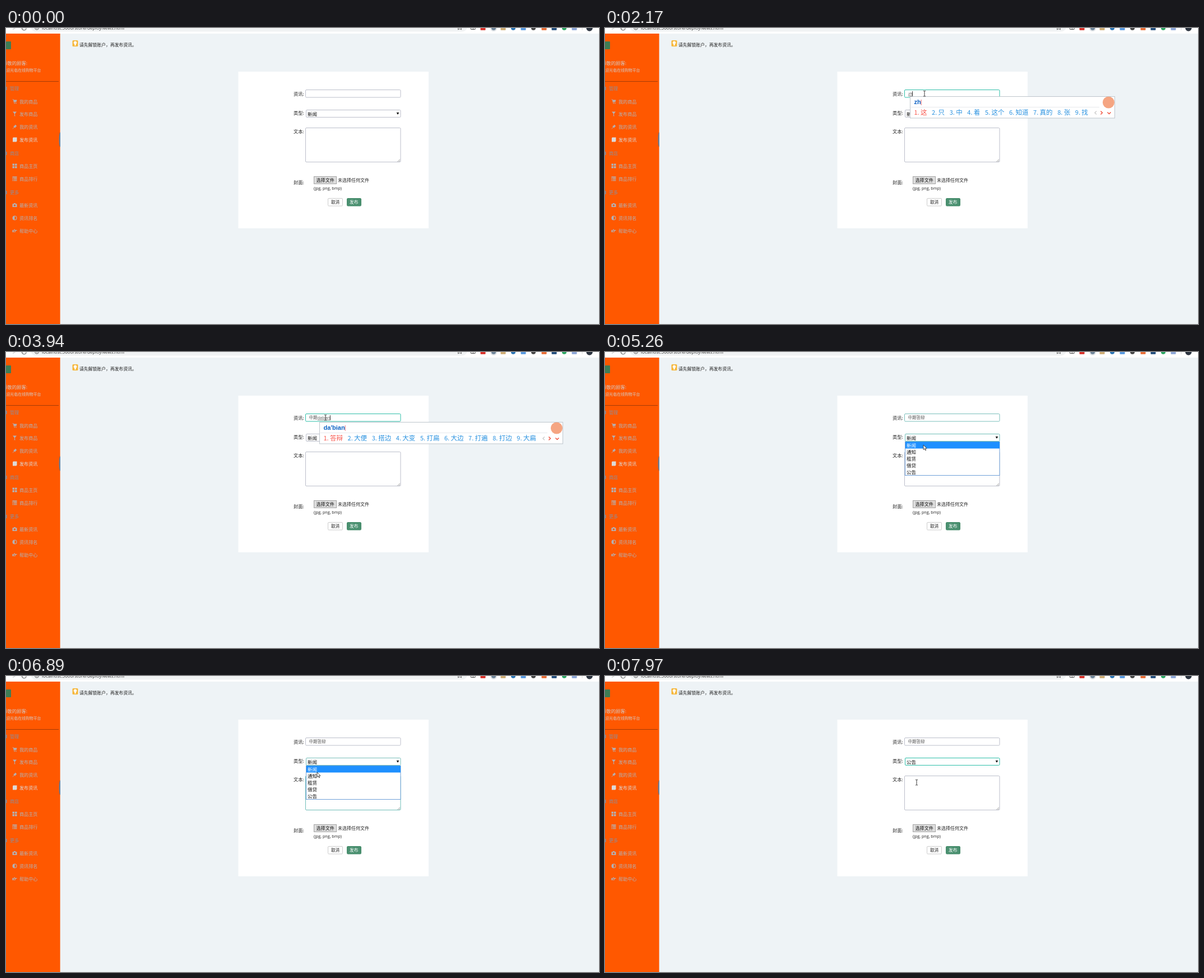
Write an HTML page that moves like this. It is 1058x529 px and loops after 8 s.

```html
<!DOCTYPE html>
<html lang="zh-CN">
<head>
<meta charset="utf-8">
<title>发布资讯</title>
<style>
  html, body { margin: 0; width: 100%; height: 100%; overflow: hidden; background: #eef3f6; }
  svg { display: block; width: 1058px; height: 529px; }
  text { font-family: "Noto Sans CJK SC", "Noto Sans CJK", "Noto Sans", sans-serif; white-space: pre; }
  .latin { font-family: "Open Sans", "Noto Sans", sans-serif; }
  .pinyin { font-family: "Liberation Sans", Arial, sans-serif; font-weight: bold; }
  .thin { font-weight: 300; }
</style>
</head>
<body>
<svg viewBox="0 0 1058 529"><g id="page"></g><g id="live"></g></svg>
<script>
const LOOP = 8000, TEAL = [45, 190, 168], GREY = [188, 191, 203];

const text = (x, y, size, fill, str, extra = '') =>
  `<text x="${x}" y="${y}" font-size="${size}" fill="${fill}" ${extra}>${str}</text>`;
const rect = (x, y, w, h, fill, extra = '') =>
  `<rect x="${x}" y="${y}" width="${w}" height="${h}" fill="${fill}" ${extra}/>`;
const disc = (x, y, r, fill, extra = '') => `<circle cx="${x}" cy="${y}" r="${r}" fill="${fill}" ${extra}/>`;
const line = (d, stroke, width = 1) => `<path d="${d}" fill="none" stroke="${stroke}" stroke-width="${width}"/>`;
const shape = (d, fill, extra = '') => `<path d="${d}" fill="${fill}" ${extra}/>`;
const clamp = (v, lo = 0, hi = 1) => Math.min(hi, Math.max(lo, v));
const within = (v, a, b) => v >= a && v < b;

// Menu icons, drawn in an 8 x 8 box
const icons = {
  cart: 'M0 0H2L2.4 1H8L7 4.5H3L3.2 5.3H7V6H2.5L1.4 .8H0ZM3 6.5h1.3v1.3H3ZM5.8 6.5h1.3v1.3H5.8Z',
  funnel: 'M.5 0H7.5L4.5 3.8V7L5.8 7.7H2.2L3.5 7V3.8Z',
  pin: 'M5 0L8 3L7 3.3L5.2 5L5 6.5L3.6 5.1L.3 8L0 7.7L2.9 4.4L1.5 3L3 2.8L4.7 1Z',
  book: 'M1.5 0H8V6.5L7 8H.5V1Z',
  grid: 'M0 0H3.5V3.5H0ZM4.5 0H8V3.5H4.5ZM0 4.5H3.5V8H0ZM4.5 4.5H8V8H4.5Z',
  list: 'M0 0H8V1.4H0ZM0 2.2H1.5V3.5H0ZM2.2 2.2H8V3.5H2.2ZM0 4.3H1.5V5.6H0ZM2.2 4.3H8V5.6H2.2ZM0 6.4H1.5V7.7H0ZM2.2 6.4H8V7.7H2.2Z',
  camera: 'M0 1.8H2L2.8 .6H5.2L6 1.8H8V7.4H0ZM4 2.7A1.7 1.7 0 1 0 4 6.1A1.7 1.7 0 1 0 4 2.7Z',
  half: 'M4 0A4 4 0 1 0 4 8A4 4 0 1 0 4 0ZM4 1.1A2.9 2.9 0 0 1 4 6.9Z',
  hand: 'M0 2.5H1.6V6.5H0ZM2 2.7L4 .8L4.6 1.2L4 2.6H8V3.7H5.8V4.5H5.5V5.3H5.2V6.6H2ZM2.8 3.3V5.8H4.4V3.4Z'
};

const menu = [
  [132, '我的商品', 'cart'], [154, '发布商品', 'funnel'], [177, '我的资讯', 'pin'], [200, '发布资讯', 'book'],
  [247, '商品主页', 'grid'], [270, '商品排行', 'list'],
  [317, '最新资讯', 'camera'], [340, '资讯排名', 'half'], [363, '帮助中心', 'hand']
];

function browserBar() {
  const round = [[905, '#2f77b5'], [941, '#4a4a4a'], [996, '#2fa866']];
  const square = [[851, '#d9362f'], [887, '#cfae77'], [923, '#5b9be0'], [960, '#e8703a'], [978, '#28527f'], [1014, '#8fa8d8']];
  return rect(0, 0, 1058, 10, '#fff') + rect(44, -12, 779, 18.5, '#f1f3f4', 'rx="9"') +
    line('M12 2.5L16.5 0', '#c0c0c0') + line('M28.5 0A3.7 3.7 0 0 0 36 .5', '#666', 1.2) +
    disc(55, -.3, 3.4, 'none', 'stroke="#666"') + rect(54.5, -1, 1, 2.5, '#666') +
    text(64, 2.6, 8.2, '#444', 'localhost:3000/store/deployNews.html', 'class="latin"') +
    line('M807 0L806.5 3L809.5 1.5L812.5 3L812 0', '#666') +
    line('M829.5 0V2.5H837V0M833.3 0V3.5', '#555') +
    disc(870, 0, 6.2, '#e3e6e9') + disc(870, 0, 4, '#71879b') +
    round.map(([x, c]) => disc(x, 0, 4, c)).join('') +
    square.map(([x, c]) => rect(x - 4.5, -5, 9, 9, c, 'rx="1"')).join('') +
    rect(1027.5, 0, 1, 4, '#ddd') + disc(1041, 0, 5.7, '#2c3440');
}

function sidebar() {
  const heads = [[108, '管理'], [224, '商店'], [294, '更多']];
  return rect(0, 10, 96.6, 519, '#ff5800') + rect(0, 24, 9, 14, '#3f7d55', 'rx="1"') +
    text(-6, 66, 8.4, '#d3cac6', '尊敬的顾客:') +
    text(62.5, 77.5, 6.9, '#d3cac6', '欢迎光临在线购物平台', 'text-anchor="end"') +
    rect(0, 95, 94, 1, '#a63c08') +
    heads.map(([y, s]) => rect(0, y - 3, 1.6, 6, '#8f8c96') + text(7, y + 3, 8.1, '#8f8c96', s)).join('') +
    menu.map(([y, s, icon]) => {
      const fill = icon == 'book' ? '#dcdad9' : '#b2b2b6';
      return shape(icons[icon], fill, `fill-rule="evenodd" transform="translate(11.5 ${y - 4.5})"`) +
        text(24, y + 3, 8.1, fill, s);
    }).join('') +
    shape('M97 186Q94.5 188 94.5 199.5T97 213Z', '#66809c');
}

function form() {
  const labels = [[121, '资讯:'], [154.5, '类型:'], [188, '文本:'], [279, '封面:']];
  return rect(118.5, 22, 10, 11, '#f6b73c', 'rx="1.5"') + disc(123.5, 26.3, 2.7, '#fff') +
    rect(122.3, 29, 2.4, 2.4, '#fff') +
    text(131, 32.8, 7.85, '#222', '请先解锁账户，再发布资讯。') +
    rect(414.5, 78, 339.5, 280, '#fff') +
    labels.map(([y, s]) => text(513, y, 8.2, '#222', s)).join('') +
    rect(549.5, 265.5, 40, 13, '#dedede', 'stroke="#a2a2a2"') +
    text(553.5, 275, 8.1, '#111', '选择文件') + text(592, 275, 8, '#222', '未选择任何文件') +
    text(549, 288.7, 7.2, '#222', '(jpg, png, bmp)', 'class="latin"') +
    rect(574.5, 304.5, 26, 13.5, '#fff', 'rx="1.5" stroke="#ccc"') +
    text(580, 313.8, 7.6, '#222', '取消', 'font-weight="500"') +
    rect(608.5, 304.5, 25, 13.5, '#4a9070', 'rx="1.5" stroke="#438a68"') +
    text(613, 313.8, 7.8, '#fff', '发布', 'font-weight="500"');
}

// [time, pinyin, candidates]; no candidates means the list is closed
const typing = [
  [2080, 'z', '在 这 中 做 怎么 自己 这个 找 早'],
  [2170, 'zh', '这 只 中 着 这个 知道 真的 张 找'],
  [2310, 'zho', '中 种 周 中间 重 总 重要 终于 州'],
  [2380, 'zhon', '中 种 重 中间 终 众 钟 忠 肿'],
  [2540, 'zhong', '中 种 重 终 众 钟 忠 肿 仲'],
  [2690, "zhong'q", '中期 中秋 重启 中枪 重器 终期 中气 中器 重球'],
  [2770, "zhong'qi", '中期 中起 重气 中企 中棋 中器 终期 中气 重器'],
  [3010, '', ''],
  [3240, 'd', '的 都 到 大 对 但 多 点 当'],
  [3330, 'da', '大 打 达 答 搭 哒 塔 瘩 妲'],
  [3710, "da'b", '答辩 大把 大部 打包 大伯 达标 大步 打扮 大巴'],
  [3790, "da'bi", '答辩 大笔 大比 达标 打比 大闭 大壁 打笔 搭臂'],
  [3860, "da'bia", '答辩 达标 大变 大便 搭边 大表 打扁 大边 打表'],
  [3940, "da'bian", '答辩 大便 搭边 大变 打扁 大边 打遍 打边 大扁'],
  [4100, '', '']
];

// [time, x, y] of the pointer
const path = [
  [0, 1000, 540], [70, 970, 500], [830, 577, 119], [980, 573, 144], [1140, 570, 117], [4500, 570, 117],
  [4640, 571, 109], [4960, 568, 152], [5120, 568, 154], [5260, 568, 166], [5340, 568, 187], [5570, 568, 217],
  [5720, 569, 230], [6100, 566, 222], [6500, 559, 190], [6720, 556, 153], [6780, 556, 155], [6890, 555, 172],
  [7370, 556, 213], [7520, 556, 214], [7970, 556, 190], [8000, 556, 190]
];

function pointerAt(t) {
  const i = path.findIndex(p => p[0] > t), [t0, x0, y0] = path[i - 1], [t1, x1, y1] = path[i];
  const s = (t - t0) / (t1 - t0), k = s * s * (3 - 2 * s);
  return [x0 + (x1 - x0) * k, y0 + (y1 - y0) * k];
}

// Border colour of a field focused from a to b, and again from c
function border(t, a, b, c = LOOP + 1) {
  const ramp = s => clamp((t - s) / 300);
  const k = ramp(a) - ramp(b) + ramp(c);
  return `rgb(${GREY.map((g, i) => Math.round(g + (TEAL[i] - g) * k))})`;
}

const field = (y, h, stroke, x = 534.5) => rect(x, y, 704 - x, h, '#fff', `rx="1.5" stroke="${stroke}"`);

function candidateList(x, y, pinyin, words) {
  let at = x + 7.5, row = '';
  words.split(' ').forEach((word, i) => {
    const fill = i ? '#2a92e0' : '#f8544a';
    row += text(at, y + 32.5, 11, fill, i + 1 + '.', 'class="thin"') +
      text(at + 11.5, y + 32.5, 11.5, fill, word, 'class="thin"');
    at += 20.1 + 11.5 * word.length;
  });
  const right = at + 39.5, mid = y + 29.5;
  const arrow = (dx, d, c) => line(`M${right - dx} ${mid}${d}`, c, 1.4);
  const caret = '<tspan dx="-1" fill="#e8606a" font-weight="300">|</tspan>';
  return rect(x + .5, y + .5, right - x - 1, 38.5, '#fff', 'stroke="#bec5cc"') +
    rect(x + 2, y + 19, right - x - 30, 1, '#e6e9ec') +
    text(x + 7.5, y + 14, 11.05, '#0b62c4', pinyin + caret, 'class="pinyin"') +
    row + disc(right - 11.5, y + 11, 10.5, '#f5a582') +
    arrow(33, 'm0 -3l-3 3l3 3', '#ccc') + arrow(25.5, 'm0 -3l3 3l-3 3', '#f0503c') +
    arrow(13.5, 'm0 -1l3 3l3 -3', '#f0503c');
}

function dropdown(y) {
  const hover = clamp(Math.floor((y - 160.5) / 12), 0, 4);
  return rect(535.5, 160.5, 168.5, 60, '#fff', 'stroke="#6f9fd8"') +
    rect(536, 160.5 + hover * 12, 168, 12, '#1e90ff') +
    ['新闻', '通知', '租赁', '借贷', '公告'].map((s, i) =>
      text(538, 169.5 + i * 12, 8.5, i == hover ? '#fff' : '#111', s)).join('');
}

function pointer(x, y, open) {
  const overText = x < 704 && (within(y, 110, 125) || !open && within(y, 178, 240));
  return overText
    ? line(`M${x - 2} ${y - 4.5}h1.5l.5 .5l.5 -.5h1.5M${x} ${y - 4}v8.5M${x - 2} ${y + 5}h1.5l.5 -.5l.5 .5h1.5`, '#222', .9)
    : shape(`M${x} ${y}v8.5l2 -1.8l1.5 3.2l1.3 -.6l-1.5 -3h2.7z`, '#fff', 'stroke="#222" stroke-width=".8"');
}

function live(t) {
  const [px, py] = pointerAt(t);
  const [, pinyin, words] = typing.filter(s => s[0] <= t).pop() || [0, '', ''];
  const committed = t < 3010 ? '' : t < 4100 ? '中期' : '中期答辩';
  const letters = pinyin.replace("'", '');
  const open = within(t, 5100, 5720) || within(t, 6750, 7510);
  const caret = within(t, 1150, 1680) || within(t, 2080, 4630);
  const start = 541 + committed.length * 7.4;
  const width = [...letters].reduce((w, c) => w + (c == 'i' ? 1.8 : c == 'z' ? 3.3 : 4.15), 0);
  return field(110.5, 13.5, border(t, 1150, 5100)) +
    text(540.5, 120.3, 7.5, '#555', committed) +
    text(start, 120, 7, '#555', letters, 'class="latin" text-decoration="underline"') +
    (caret ? rect(start + width - .5, 113, 1, 9, '#333') : '') +
    field(146.5, 13, border(t, 5100, 5720, 6750), 535.5) +
    text(538, 156.5, 8.5, '#111', t < 7510 ? '新闻' : '公告') + shape('M696.7 151h4.6l-2.3 4z', '#111') +
    field(178.5, 61, border(t, 5800, 6750)) + line('M698.5 239l4.5 -4.5M701 239l2 -2', '#888', .8) +
    (open ? dropdown(py) : '') +
    (words ? candidateList(committed ? 559 : 544, committed ? 125 : 122, pinyin, words) : '') +
    pointer(px, py, open);
}

document.getElementById('page').innerHTML = browserBar() + sidebar() + form();
const stage = document.getElementById('live');
(function tick() {
  stage.innerHTML = live(performance.now() % LOOP);
  requestAnimationFrame(tick);
})();
</script>
</body>
</html>
```
